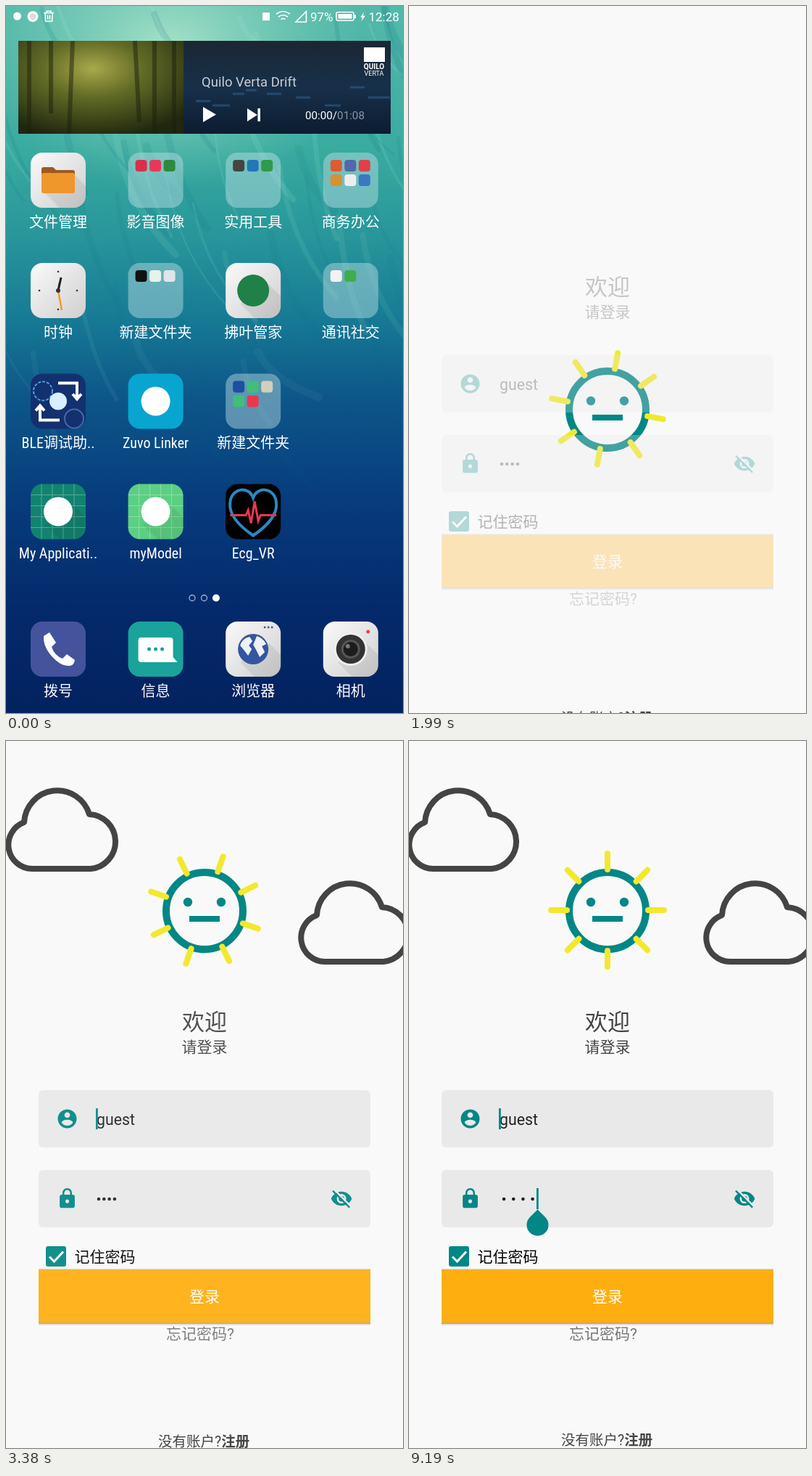
An HTML page that plays this animation: 548x974 px, repeating every 9310 ms.

```html
<!DOCTYPE html>
<html lang="zh">
<head>
<meta charset="utf-8">
<style>
html, body { margin: 0; height: 100%; overflow: hidden; background: #f9f9f9; }
svg { display: block; width: 548px; height: 974px; }
text { font-family: Roboto, "Noto Sans CJK SC", "Noto Sans CJK", sans-serif; }
.label { font-family: "Roboto Condensed", Roboto, "Noto Sans CJK SC", "Noto Sans CJK", sans-serif; font-stretch: condensed; text-anchor: middle; fill: #fff; }
.mid { text-anchor: middle; }
.teal { fill: #018786; }
.line { fill: none; stroke: #fff; stroke-width: 1.6; }
</style>
</head>
<body>
<svg viewBox="0 0 548 974">
  <defs>
    <linearGradient id="sea" x2="0" y2="1">
      <stop offset="0" stop-color="#55b9aa"/><stop offset=".2" stop-color="#3aaba0"/>
      <stop offset=".33" stop-color="#27959a"/><stop offset=".44" stop-color="#177b95"/>
      <stop offset=".55" stop-color="#0d5789"/><stop offset=".7" stop-color="#073c7d"/>
      <stop offset=".85" stop-color="#042a6b"/><stop offset="1" stop-color="#03225f"/>
    </linearGradient>
    <radialGradient id="glow" cx=".5" cy=".5" r=".5">
      <stop offset="0" stop-color="#c8f2d4" stop-opacity=".75"/><stop offset="1" stop-color="#8fd8c0" stop-opacity="0"/>
    </radialGradient>
    <linearGradient id="paper" x2="1" y2="1"><stop offset="0" stop-color="#fafafa"/><stop offset="1" stop-color="#cfcfcf"/></linearGradient>
    <radialGradient id="forest" cx=".45" cy=".3" r=".75">
      <stop offset="0" stop-color="#a9a94a"/><stop offset=".4" stop-color="#626c26"/><stop offset="1" stop-color="#20260f"/>
    </radialGradient>
    <linearGradient id="night" y2="1" x2="0"><stop offset="0" stop-color="#1b2733"/><stop offset=".5" stop-color="#17304a"/><stop offset="1" stop-color="#0d1c30"/></linearGradient>
    <g id="cloud"><path d="M37 176A33 33 0 0 1 26 112A46 46 0 0 1 116 101A37.6 37.6 0 0 1 118 176Z" fill="none" stroke="#444" stroke-width="8" stroke-linejoin="round"/></g>
  </defs>

  <g id="home">
    <rect width="548" height="974" fill="url(#sea)"/>
    <ellipse cx="225" cy="60" rx="270" ry="190" fill="url(#glow)"/>
    <g id="streaks" fill="none" stroke-linecap="round"></g>
    <rect x="17" y="48" width="514" height="128" fill="url(#night)"/>
    <rect x="17" y="48" width="228" height="128" fill="url(#forest)"/>
    <path d="M32 48v128M62 48v100M92 48l-5 128M178 48l6 112M205 48v128M232 48v128" stroke="#1c220d" stroke-width="6" opacity=".5"/>
    <path d="M262 131h20M285 137h24M313 121h16M331 116h15M360 121h20M400 126h20M440 137h22M475 112h20M500 126h30" stroke="#2d6797" stroke-width="3" opacity=".55"/>
    <rect x="494" y="57" width="29" height="20" fill="#fff"/>
    <g fill="#fff" font-size="10" class="mid"><text x="508" y="86.500" font-weight="700">QUILO</text><text x="508" y="95.500" font-size="9">VERTA</text></g>
    <text x="270" y="111" font-size="18.500" fill="#c9ced3">Quilo Verta Drift</text>
    <path d="M272 139v21l18-10.500zM333 141v18l14-9zM347.500 141h3.500v18h-3.500z" fill="#fff"/>
    <text x="413" y="156" font-size="15.200" fill="#fff">00:00/<tspan fill="#8b959f">01:08</tspan></text>
    <g id="apps"></g>
    <g fill="none" stroke="#9fb6d6" stroke-width="1.300"><circle cx="257" cy="815.500" r="4"/><circle cx="273.500" cy="815.500" r="4"/></g>
    <circle cx="290" cy="815.500" r="5" fill="#fff"/>
  </g>

  <rect id="window" fill="#f9f9f9"/>
  <g id="status">
    <rect id="shade" width="548" height="29" fill="#999"/>
    <circle cx="15.500" cy="14" r="5.500" fill="#fff"/>
    <circle cx="37" cy="14.500" r="7.500" fill="#fff"/><circle cx="37" cy="14.500" r="4.300" fill="#ddd"/>
    <path class="line" d="M52 9.500h14M56 9v-2h6v2M54 10l.6 11h9l.6-11M57.500 12.500v6M60.500 12.500v6"/>
    <rect x="354" y="9" width="10" height="11" fill="#fff"/>
    <path class="line" d="M373 11q9.500-7 19 0M376 15q6.500-5 13 0M379.500 18.500q3-2.500 6 0M400 22h14.500V7.500z"/>
    <rect class="line" x="456" y="8.500" width="24" height="11.500" rx="2"/>
    <path d="M458.500 11h19v6.500h-19zM481 12h2v5h-2zM494 8.500l-5 7h3l-1.500 5.500 5.500-7.500h-3z" fill="#fff"/>
    <g fill="#fff" font-size="17"><text x="420" y="21">97%</text><text x="500.500" y="21">12:28</text></g>
  </g>

  <g id="login">
    <use id="cloudLeft" href="#cloud"/><use id="cloudRight" href="#cloud"/>
    <g id="sun">
      <circle r="53" cy="1" fill="none" stroke="#018786" stroke-width="10"/>
      <g class="teal"><circle cx="-23" cy="-11" r="6.200"/><circle cx="23" cy="-11" r="6.200"/><rect x="-21" y="8" width="42" height="8"/></g>
      <g id="rays" stroke="#f2e92c" stroke-width="8" stroke-linecap="round"></g>
    </g>
    <g id="form">
      <g class="mid" fill="#444"><text x="274" y="398" font-size="31">欢迎</text><text x="274" y="429" font-size="21">请登录</text></g>
      <g fill="#e9e9e9"><rect x="45" y="481" width="458" height="79" rx="6"/><rect x="45" y="591" width="458" height="79" rx="6"/></g>
      <path class="teal" transform="translate(68.900 504.900) scale(1.300)" d="M12 2C6.480 2 2 6.480 2 12s4.480 10 10 10 10-4.480 10-10S17.520 2 12 2zm0 3c1.660 0 3 1.340 3 3s-1.340 3-3 3-3-1.340-3-3 1.340-3 3-3zm0 14.200c-2.500 0-4.710-1.280-6-3.220.030-1.990 4-3.080 6-3.080 1.990 0 5.970 1.090 6 3.080-1.290 1.940-3.500 3.220-6 3.220z"/>
      <path class="teal" transform="translate(68.900 614.700) scale(1.300)" d="M18 8h-1V6c0-2.760-2.240-5-5-5S7 3.240 7 6v2H6c-1.100 0-2 .9-2 2v10c0 1.100.9 2 2 2h12c1.100 0 2-.9 2-2V10c0-1.100-.9-2-2-2zm-6 9c-1.100 0-2-.9-2-2s.9-2 2-2 2 .9 2 2-.9 2-2 2zm3.100-9H8.900V6c0-1.710 1.390-3.100 3.100-3.100s3.100 1.390 3.100 3.100z"/>
      <g transform="translate(447.500 615) scale(1.300)">
        <path class="teal" d="M12 4.500C7 4.500 2.730 7.610 1 12c1.730 4.390 6 7.500 11 7.500s9.270-3.110 11-7.500c-1.730-4.390-6-7.500-11-7.500zM12 17a5 5 0 1 1 0-10 5 5 0 0 1 0 10zm0-8a3 3 0 1 0 0 6 3 3 0 0 0 0-6z"/>
        <g id="slash" fill="none" stroke-width="1.800"><path d="M4.200 2.200L22 20" stroke="#e9e9e9"/><path d="M2.700 3.500L20.500 21.300" stroke="#018786"/></g>
      </g>
      <g fill="#222" font-size="21.300">
        <text x="125" y="529">guest</text>
        <text id="digits" x="124.500" y="639">1234</text>
        <g id="dots"><circle cy="631" r="2.300"/><circle cy="631" r="2.300"/><circle cy="631" r="2.300"/><circle cy="631" r="2.300"/></g>
      </g>
      <rect id="userCaret" class="teal" x="124" y="506" width="2.800" height="29"/>
      <rect id="passCaret" class="teal" y="616" width="2.800" height="29"/>
      <rect class="teal" x="55" y="696" width="28" height="28" rx="3"/>
      <path d="M60 710.500l6.500 6.500L79 703.500" fill="none" stroke="#fff" stroke-width="3"/>
      <text x="94.500" y="718" font-size="21">记住密码</text>
      <rect x="45" y="730" width="458" height="75" fill="#000" opacity=".1"/>
      <rect x="45" y="727.500" width="458" height="75.500" fill="#000" opacity=".25"/>
      <rect x="45" y="728.500" width="458" height="73" fill="#ffae0f"/>
      <text class="mid" x="274" y="773" font-size="21" fill="#fff">登录</text>
      <text x="221" y="824" font-size="21" fill="#777">忘记密码?</text>
      <path id="handle" class="teal" d="M0 0L10.600 10.600A15 15 0 1 1-10.600 10.600Z" transform="translate(177.500 645.500)"/>
    </g>
    <text id="signup" x="210" font-size="19.500" fill="#444">没有账户?<tspan font-weight="700">注册</tspan></text>
  </g>
</svg>
<script>
const $ = id => document.getElementById(id);
const set = (id, attrs) => { for (const k in attrs) $(id).setAttribute(k, attrs[k]); };
const show = (id, on) => $(id).style.display = on ? '' : 'none';
const clamp = v => Math.min(1, Math.max(0, v));
const smooth = v => (v = clamp(v), v * v * (3 - 2 * v));

let seed = 7;
const random = () => (seed = seed * 16807 % 2147483647) / 2147483647;

// Soft currents in the wallpaper
let streaks = '';
for (let i = 0; i < 70; i++) {
  const x = random() * 640 - 60, y = random() * 560 - 40, length = 60 + random() * 130, lean = 30 + random() * 60;
  const color = random() < .55 ? '#a5e6d0' : '#0d6f80';
  streaks += `<path d="M${x} ${y}q${lean * .2} ${length * .6} ${lean} ${length}" stroke="${color}" stroke-width="${2 + random() * 9}" opacity="${(.16 * (1 - y / 700)).toFixed(3)}"/>`;
}
$('streaks').innerHTML = streaks;

const disc = (color, r = 22) => `<circle cx="38" cy="38" r="${r}" fill="${color}"/>`;
const minis = colors => colors.map((c, i) =>
  `<rect x="${10 + i % 3 * 19.5}" y="${10 + (i / 3 | 0) * 20}" width="16" height="16" rx="4" fill="${c}"/>`).join('');
const shadow = '<path d="M60 30L76 46V62Q76 76 62 76H40L20 56Z" fill="#000" opacity=".07"/>';
const grid = '<path d="M0 15h76M0 30h76M0 45h76M0 60h76M15 0v76M30 0v76M45 0v76M60 0v76" stroke="#fff" opacity=".3"/>';
const glass = 'rgba(190,225,228,.45)', paper = 'url(#paper)';

const icons = {
  files: shadow + '<path d="M15 23q0-3 3-3h13l4 4h23q3 0 3 3v27H15z" fill="#9c5a20"/><rect x="15" y="28" width="46" height="28" rx="3" fill="#ef962d"/>',
  clock: '<g stroke="#222" stroke-width="2.5"><path d="M38 38l4-18M38 38l2-10" stroke-width="3"/><path d="M38 38l5 27" stroke="#f29a2e"/></g><g fill="#333"><circle cx="38" cy="38" r="3"/><circle cx="38" cy="12" r="1.3"/><circle cx="12" cy="38" r="1.3"/><circle cx="64" cy="38" r="1.3"/><circle cx="38" cy="64" r="1.3"/></g>',
  debug: '<g fill="none" stroke="#fff" stroke-width="4"><path d="M38 13h26v20M58 28l6 7 6-7M40 64H13V45M7 51l6-7 6 7"/><circle cx="17" cy="24" r="13" stroke="#4aa3dc" stroke-width="2" stroke-dasharray="4 2"/><circle cx="60" cy="62" r="13" stroke="#4669a8" stroke-width="2"/></g>' + disc('#d8efff', 12),
  heart: '<path d="M38 71C16 56 5 42 6 27C7 5 32 2 38 19C44 2 69 5 70 27C71 42 60 56 38 71Z" fill="none" stroke="#2b88c4" stroke-width="4"/><path d="M6 43h22l3-7 4 18 5-30 5 27 3-8h22" fill="none" stroke="#e8384f" stroke-width="3"/>',
  phone: '<path d="M18 20l8-5 9 14-6 6q4 12 15 16l6-6 11 8q-1 7-7 8-14 1-28-17Q17 32 18 20z" fill="#fff"/>',
  message: '<path d="M18 22h40q4 0 4 4v23l6 7H18q-4 0-4-4V26q0-4 4-4z" fill="#fff"/><g fill="#18a098"><circle cx="29" cy="38" r="2.500"/><circle cx="38" cy="38" r="2.500"/><circle cx="47" cy="38" r="2.500"/></g>',
  browser: shadow + disc('#3456a0', 21) + '<path d="M20 33q3-10 13-12l4 6-5 6 4 5-5 9-6-8zM43 20q9 3 13 11l-6 3 4 8-7 7-5-10-4-7z" fill="#eef2f6"/><g fill="#3456a0"><circle cx="54" cy="8" r="1.400"/><circle cx="59" cy="8" r="1.400"/><circle cx="64" cy="8" r="1.400"/></g>',
  camera: shadow + disc('#eee', 23) + disc('#333', 20) + disc('#555', 13) + disc('#1c1c1c', 10) + '<circle cx="34" cy="34" r="3" fill="#777"/><circle cx="62" cy="14" r="2.500" fill="#e44"/>'
};

// [column, top, label, tile fill, picture]
const apps = [
  [0, 202, '文件管理', paper, icons.files],
  [1, 202, '影音图像', glass, minis(['#d8304c', '#e8385a', '#2c8a3a'])],
  [2, 202, '实用工具', glass, minis(['#444', '#2277b8', '#2f9a48'])],
  [3, 202, '商务办公', glass, minis(['#e05a32', '#5268a8', '#e0404a', '#d8912e', '#eee', '#3a78c0'])],
  [0, 354, '时钟', paper, icons.clock],
  [1, 354, '新建文件夹', glass, minis(['#111', '#e6f2ec', '#dfe5e8'])],
  [2, 354, '拂叶管家', paper, shadow + disc('#1f8048')],
  [3, 354, '通讯社交', glass, minis(['#f2f2f2', '#3fae4a'])],
  [0, 506.5, 'BLE调试助..', '#13306f', icons.debug],
  [1, 506.5, 'Zuvo Linker', '#08a5d0', disc('#fff', 20)],
  [2, 506.5, '新建文件夹', glass, minis(['#1d4fa0', '#3fbf7a', '#d0d0bc', '#3fbf7a', '#e83850'])],
  [0, 658.5, 'My Applicati..', '#11836f', grid + shadow + disc('#fff', 20)],
  [1, 658.5, 'myModel', '#5ccf82', grid + shadow + disc('#fff', 20)],
  [2, 658.5, 'Ecg_VR', '#000', icons.heart],
  [0, 848, '拨号', '#44539c', icons.phone],
  [1, 848, '信息', '#1aa39a', icons.message],
  [2, 848, '浏览器', paper, icons.browser],
  [3, 848, '相机', paper, icons.camera]
];
$('apps').innerHTML = apps.map(([column, top, label, fill, picture]) =>
  `<g transform="translate(${34 + column * 134.6} ${top})"><rect width="76" height="76" rx="16" fill="${fill}"/>${picture}` +
  `<text class="label" x="38" y="102.500" font-size="20">${label}</text></g>`).join('');

for (let a = 0; a < 360; a += 45) $('rays').innerHTML += `<path d="M0-56V-78" transform="rotate(${a})"/>`;

const dots = [...$('dots').children];

function draw(t) {
  const started = t >= 1020;
  show('home', t < 530);
  show('status', !started);
  show('login', started);

  // The app window grows out of its icon
  const open = clamp((t - 40) / 470), grow = 1 - (1 - open) ** 3;
  const mix = (a, b) => a + (b - a) * grow;
  set('window', { x: mix(34, 0), y: mix(658.5, 0), width: mix(76, 548), height: mix(76, 974), rx: mix(16, 0), opacity: clamp(open * 4) });
  set('shade', { opacity: smooth((grow - .85) / .15) });

  // One eased progress drives the login scene
  const u = clamp((t - 654) / 3486), p = u * u / (u * u + (1 - u) ** 2);
  const drift = 42 * (1 - p), cloudAlpha = clamp((p - .775) / .1);
  set('sun', { transform: `translate(274 ${555 - 322 * smooth((p - .58) / .21)})` });
  set('rays', { transform: `rotate(${360 * p})` });
  set('cloudLeft', { x: drift - 4, opacity: cloudAlpha });
  set('cloudRight', { x: 406 - drift, y: 128, opacity: cloudAlpha });
  set('form', { opacity: p });
  set('signup', { y: 970 + 25 * (1 - p) });

  // Password shown, then hidden again
  const revealed = t >= 4900 && t < 5900, edited = t >= 5900;
  show('digits', revealed);
  show('dots', !revealed);
  show('slash', !revealed);
  dots.forEach((d, i) => d.setAttribute('cx', edited ? 131 + 13.2 * i : 128 + 7.3 * i));
  show('userCaret', t > 2900 && (t - 80) % 1000 < 500);
  show('passCaret', t >= 4900);
  set('passCaret', { x: edited ? 176 : 171 });
  show('handle', t >= 6400);
}

function loop() {
  draw(performance.now() % 9310);
  requestAnimationFrame(loop);
}
loop();
</script>
</body>
</html>
```
